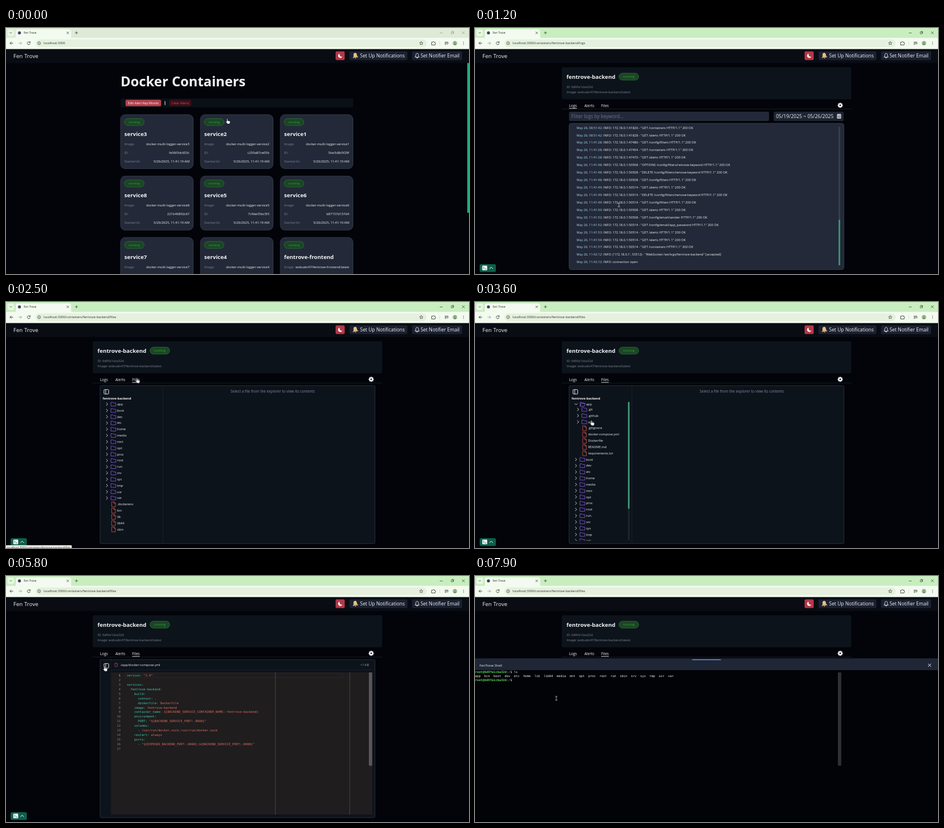
Write an HTML page that moves like this. It is 800x426 px and loops after 8000 ms.

```html
<!DOCTYPE html>
<html lang="en">
<head>
<meta charset="utf-8">
<title>Fen Trove</title>
<style>
html, body { margin: 0; width: 100%; height: 100%; overflow: hidden; background: #020409; }
svg { display: block; width: 800px; height: 426px; }
text { font-family: "Open Sans", "Noto Sans", sans-serif; white-space: pre; }
.mono { font-family: "DejaVu Sans Mono", "Liberation Mono", monospace; }
</style>
</head>
<body>
<svg id="stage" viewBox="0 0 800 426" xmlns="http://www.w3.org/2000/svg"></svg>
<script>
const LOOP = 8000;
const WHITE = '#f1f3f5', GREY = '#7f8591', CARD = '#232938', DARK = '#0d131b', GREEN = '#349a78';

// Drawing helpers, each returning markup
const rect = (x, y, w, h, fill, r = 0, more = '') =>
  `<rect x="${x}" y="${y}" width="${w}" height="${h}" rx="${r}" fill="${fill}" ${more}/>`;
const text = (x, y, s, size, fill = WHITE, more = '') =>
  `<text x="${x}" y="${y}" font-size="${size}" fill="${fill}" ${more}>${s}</text>`;
const line = (d, color, w = 0.9, more = '') =>
  `<path d="${d}" fill="none" stroke="${color}" stroke-width="${w}" stroke-linecap="round" stroke-linejoin="round" ${more}/>`;
const shape = (d, fill, more = '') => `<path d="${d}" fill="${fill}" ${more}/>`;
const dot = (x, y, r, fill, more = '') => `<circle cx="${x}" cy="${y}" r="${r}" fill="${fill}" ${more}/>`;
const group = (body, more = '') => `<g ${more}>${body}</g>`;
const at = (x, y, body) => group(body, `transform="translate(${x} ${y})"`);
const during = (from, to, body) => group(body, `data-from="${from}" data-to="${to}"`);
const BOLD = 'font-weight="700"', END = 'text-anchor="end"', MID = 'text-anchor="middle"', MONO = 'class="mono"';

const pill = (x, y) =>
  rect(x, y, 34, 12, '#1b4525', 6, 'stroke="#2a7a35" stroke-width=".7"') +
  text(x + 17, y + 8, 'running', 5.4, '#33a136', MID);

// Container overview
function card(col, row, [name, id, image, when]) {
  const x = 198 + col * 138, y = 150 + row * 106.4, right = x + 119;
  const extra = image.length > 1 ? 9 : 0;
  const field = (label, value, dy) =>
    text(x + 6.5, y + dy, label, 5.65, GREY) + text(right, y + dy, value, 5.65, WHITE, END);
  return rect(x, y, 125.5, row === 3 ? 102.5 : 93.6, CARD, 8, 'stroke="#3a4252" stroke-width=".8"') +
    pill(x + 6.7, y + 6.8) +
    text(x + 6.5, y + 36.8, name, 9.55, WHITE, BOLD) +
    field('Image:', image[0], 53) +
    (extra ? text(right, y + 62, image[1], 5.65, WHITE, END) : '') +
    field('ID:', id, 68 + extra) + field('Started At:', when, 83 + extra);
}

function homePage() {
  const logger = (n, id) => ['service' + n, id, ['docker-multi-logger-service' + n], '5/26/2025, 11:41:19 AM'];
  const own = (part, id, sec) =>
    ['fentrove-' + part, id, ['wobudo47/fentrove-' + part + ':latest'], '5/26/2025, 8:49:' + sec + ' AM'];
  const updater = own('autoupdate', 'e96d51e02662', 53);
  updater[2] = ['wobudo47/fentrove-', 'autoupdate:latest'];
  const cards = [
    logger(3, 'fe56f3dc653c'), logger(2, 'c250a87ce05b'), logger(1, '5be3c8b5f29f'),
    logger(8, '221b40892c67'), logger(5, '7c9be35bc5f3'), logger(6, 'b87157d137d4'),
    logger(7, '2a7412ebe5b9'), logger(4, 'a51004f233da'), own('frontend', '06c1406e8c47', 54),
    own('backend', '6d9fa1cba32d', 53), own('notifier', 'f6546cf1a6b5', 53), updater
  ];
  return group(
    text(198, 101, 'Docker Containers', 23.4, WHITE, BOLD) +
    rect(198, 122, 402, 15.5, '#0b0f16', 2) +
    rect(206.5, 124.3, 61.5, 11.2, '#b2424c', 2) + text(237.2, 132, 'Edit Alert Key-Words', 5.65, '#fff', MID) +
    rect(274.3, 126.5, 1, 7, '#e8eaed') +
    rect(282, 124.3, 38, 11.2, '#3a1019', 2) + text(301, 132, 'Clear Alerts', 5.65, '#d04c57', MID) +
    cards.map((c, i) => card(i % 3, Math.floor(i / 3), c)).join(''), 'id="home"') +
    rect(797, 60, 3, 260, '#22a884', 1, 'id="thumb"');
}

// Container details
function logView() {
  const remove = '/config/filters/remove-keyword';
  const requests = [
    ['08:51:42', 41826, 'GET /containers'], ['08:51:42', 41828, 'GET /alerts'],
    ['11:41:28', 47486, 'GET /config/filters'], ['11:41:28', 47454, 'GET /containers'],
    ['11:41:28', 47470, 'GET /alerts'], ['11:41:48', 50508, 'OPTIONS ' + remove],
    ['11:41:48', 50508, 'DELETE ' + remove], ['11:41:48', 50508, 'GET /config/filters'],
    ['11:41:49', 50514, 'GET /alerts'], ['11:41:49', 50514, 'DELETE ' + remove],
    ['11:41:49', 50514, 'GET /config/filters'], ['11:41:50', 50508, 'GET /alerts'],
    ['11:41:52', 50508, 'GET /config/email/sender'], ['11:41:52', 50514, 'GET /config/email/app_password'],
    ['11:41:53', 50514, 'GET /alerts'], ['11:41:54', 50514, 'GET /alerts'], ['11:41:57', 50514, 'GET /containers']
  ].map(([time, port, req]) => [time, `172.18.0.1:${port} - "${req} HTTP/1.1" 200 OK`]);
  const lines = requests.concat([
    ['11:42:12', `('172.18.0.1', 53512) - "WebSocket /ws/logs/fentrove-backend" [accepted]`],
    ['11:42:12', 'connection open']
  ]);
  const calendar = rect(625.5, 149.5, 7, 7.5, WHITE, 1) + line('M627.3 148.5v2M630.7 148.5v2', WHITE) +
    line('M626 151.6h6M626 153.4h6M626 155.2h6M627.8 151.6v5M630.2 151.6v5', CARD, 0.5);
  return rect(162.5, 145, 345.5, 16, CARD, 2) +
    text(166.5, 156.3, 'Filter logs by keyword...', 8.36, '#6c7280') +
    rect(516, 145, 121, 16, '#1e2432', 2) +
    text(520, 156.3, '05/19/2025 ~ 05/26/2025', 8.5) + calendar +
    rect(162.5, 165, 475, 253.5, CARD, 4, 'stroke="#363e4d" stroke-width=".8"') +
    group(lines.map(([time, msg], i) => text(175.5, 174.6 + i * 12.93,
      `<tspan fill="#a9d7f2">May 26, ${time}:</tspan> INFO: ${msg}`, 5.55)).join(''), 'clip-path="url(#logClip)"') +
    rect(628.3, 171, 2.6, 240, '#3a4150', 1) + rect(628.3, 332, 2.6, 79, GREEN, 1);
}

const page = 'M0 -4h3.8l2.2 2.2v6.2h-6zM3.6 -4v2.4h2.4';
const folder = 'M0 -3.2h3l1 1.2h4v5.2h-8z';
const openFolder = 'M0 3.2v-6.4h3l1 1.2h3.3v1.4M0 3.2l1.6 -4.6h7l-1.4 4.6z';

function tree(items, picked) {
  let out = '', y = 177;
  const walk = (list, depth) => list.forEach(([name, kind, kids], i) => {
    const x = depth * 3.4;
    if (depth || i) y += depth && !i ? 9 : 10.83;
    if (name === picked) out += rect(167, y - 4.6, 96, 9.2, '#14393a', 1);
    if (kind === 'file') out += at(183 + x, y, line(page, '#d8534f', 0.8));
    else out += at(174.6 + x, y, line(kids ? 'M-2.2 -1.2l2.2 2.3l2.2 -2.3' : 'M-1.2 -2.3l2.4 2.3l-2.4 2.3', '#d8dbe0')) +
      at(181.7 + x, y, line(kids ? openFolder : folder, '#8257d8', 0.85));
    out += text(192 + x, y + 2, name, 5.5);
    if (kids) walk(kids, depth + 1);
  });
  walk(items, 0);
  return group(out, 'clip-path="url(#treeClip)"');
}

function sidebar() {
  const dirs = s => s.split(' ').map(n => [n, 'dir']);
  const files = s => s.split(' ').map(n => [n, 'file']);
  const others = [...dirs('boot dev etc home media mnt opt proc root run srv sys tmp usr var'),
    ...files('.dockerenv bin lib lib64 sbin')];
  const source = [...dirs('__pycache__ routes'),
    ...files('__init__.py alerts.py config.yml docker_utils.py main.py send_email.py')];
  const app = inner => ['app', 'dir', [...dirs('.git .github'), ['app', 'dir', inner],
    ...files('.gitignore docker-compose.yml Dockerfile README.md requirements.txt')]];
  const bar = h => rect(264.4, 173, 2.6, 240, '#1f2733', 1) + rect(264.4, 173, 2.6, h, '#3f9f7a', 1);
  const full = [app(source), ...others];
  return during(2100, 5700,
    line('M271 145V418', '#1d2430', 0.8) +
    text(167, 168.5, 'fentrove-backend', 5.6, WHITE, BOLD) +
    during(2100, 3100, tree([['app', 'dir'], ...others])) +
    during(3100, 3700, tree([app(), ...others]) + bar(185)) +
    during(3700, 4400, tree(full) + bar(142)) +
    during(4400, 5700, tree(full, 'docker-compose.yml') + bar(142)));
}

function editor() {
  const yaml = [
    'version: "3.9"', '', 'services:', '  fentrove-backend:', '    build:', '      context: .',
    '      dockerfile: Dockerfile', '    image: fentrove-backend',
    '    container_name: ${BACKEND_SERVICE_CONTAINER_NAME:-fentrove-backend}', '    environment:',
    '      PORT: "${BACKEND_SERVICE_PORT:-8000}"', '    volumes:',
    '      - /var/run/docker.sock:/var/run/docker.sock', '    restart: always', '    ports:',
    '      - "${EXPOSED_BACKEND_PORT:-8000}:${BACKEND_SERVICE_PORT:-8000}"', ''
  ];
  const row = (s, i) => {
    const [, lead, key = '', value] = s.match(/^(\s*(?:- )?)([\w-]+:(?= |$))?(.*)$/);
    const y = 174 + i * 7.93;
    return text(198, y, i + 1, 5.32, i ? '#858585' : '#d0d0d0', END + ' ' + MONO) +
      text(208.8, y, `<tspan fill="#d4d4d4">${lead}</tspan><tspan fill="#3dc9b0">${key}</tspan>${value}`, 5.32, '#dc6f62', MONO);
  };
  return rect(181.5, 167, 600, 246, '#1f1d1e') +
    rect(206, 168, 376, 8, 'none', 0, 'stroke="#2c2a2b" stroke-width=".8"') +
    line('M465.4 167V413M594 167V413', '#4a544e', 0.8) + yaml.map(row).join('');
}

function filePane() {
  return rect(162.5, 144.8, 475, 273.5, DARK, 2, 'stroke="#2b323e" stroke-width=".9"') +
    rect(169.3, 151.7, 8.2, 7.6, 'none', 1, 'stroke="#f1f3f5" stroke-width=".9"') + line('M172.2 152V159', WHITE) +
    sidebar() +
    during(2100, 4500, text(461, 156.6, 'Select a file from the explorer to view its contents', 6.35, '#858b96', MID)) +
    during(4500, LOOP,
      group(group(
        at(188.5, 153.7, line(page, '#c94b66', 0.9, 'transform="scale(.7)"')) +
        text(198, 156, '/app/docker-compose.yml', 5.6) +
        line('M181.5 162.5H637', '#1d2430', 0.8) + line('M181.5 145V418', '#1a212c', 0.6) +
        during(4500, 4700, text(182, 173.3, 'Loading file content...', 5.5)) +
        during(4700, LOOP, editor()), 'id="pane"'), 'clip-path="url(#paneClip)"') +
      during(4700, LOOP, text(627, 156, '&lt;1 KB', 5.5, '#a2a7b0', END) + rect(627, 167, 5.7, 161.5, '#585657')));
}

function gear() {
  let teeth = '';
  for (let a = 0; a < 360; a += 45) teeth += rect(-1.1, -4.4, 2.2, 3, WHITE, 0.4, `transform="rotate(${a})"`);
  return at(631, 133.8, teeth + dot(0, 0, 2.3, 'none', `stroke="${WHITE}" stroke-width="1.7"`));
}

function detailPage() {
  const underline = (x, w) => rect(x, 138.8, w, 0.8, WHITE);
  return rect(0, 60, 800, 366, '#020409') +
    rect(150, 68, 500, 55.5, DARK, 2.5) +
    text(158, 88, 'fentrove-backend', 9.6, WHITE, BOLD) + pill(248.8, 78.2) +
    text(158.3, 104, 'ID: 6d9fa1cba32d', 5.55, GREY) +
    text(158.3, 113, 'Image: wobudo47/fentrove-backend:latest', 5.6, GREY) +
    text(162.5, 136.6, 'Logs', 6.35) + text(189, 136.6, 'Alerts', 6.35) + text(218, 136.6, 'Files', 6.35) +
    line('M150 140.3H650', '#1d232c', 0.8) + gear() +
    during(1000, 2100, underline(162.5, 13.5) + logView()) +
    during(2100, LOOP, underline(218, 13) + filePane()) +
    rect(8, 409, 28, 13.5, '#0d5f4b', 2.5) + rect(12.5, 411.6, 8.6, 7.8, WHITE, 1.2) +
    line('M14.3 413.6l1.6 1.5l-1.6 1.5M17 417.2h2.2', '#0d5f4b', 0.8) + line('M25.3 416.8l2.7 -2.7l2.7 2.7', WHITE, 1);
}

// Page header and browser frame
function header() {
  const bell = 'M-3.4 2.4c1.3 -1.2 .9 -3 1.2 -4.4c.4 -2.3 4 -2.3 4.4 0c.3 1.4 -.1 3.2 1.2 4.4z';
  return rect(0, 36.5, 800, 24, '#090c13') +
    text(12.7, 52, 'Fen Trove', 9.65) +
    rect(569.5, 40.5, 15.7, 15, '#b33848', 2) +
    shape('M576.6 44.2a3.9 3.9 0 1 0 4.7 5.2a3.7 3.7 0 0 1 -4.7 -5.2z', '#fff') +
    rect(593.5, 40.5, 100, 15, '#1b2130', 2) +
    at(603.5, 47.7, group(shape(bell, '#e6c08a', 'transform="scale(1.25)"') +
      line('M-4.4 3h8.8', '#c98a4a', 1.2) + dot(0, 4.2, 1.1, '#c98752'), 'transform="rotate(-8)"')) +
    text(611.8, 51.4, 'Set Up Notifications', 8.4) +
    rect(701.5, 40.5, 86.5, 15, '#1b2130', 2) +
    at(710.4, 47.7, line(bell, WHITE, 0.9) + line('M-1 4h2', WHITE, 1)) +
    text(716.2, 51.4, 'Set Notifier Email', 8.4);
}

function browser() {
  const ink = '#3c443a';
  const url = (from, to, path) => during(from, to, text(65, 28.4, 'localhost:3000' + path, 5.5, '#2c332b'));
  const deep = '/containers/fentrove-backend/';
  const controls = color => line('M750 8.6h4', color, 0.7) +
    rect(769.3, 7, 3.2, 3.2, 'none', 0.6, `stroke="${color}" stroke-width=".7"`) +
    line('M770.3 6h3.1v3.1M788.3 6.3l4 4m0 -4l-4 4', color, 0.7);
  return rect(0, 0, 800, 18, '#deead6') +
    during(0, 1000, controls('#8c9a87')) +
    during(1000, LOOP, rect(0, 0, 800, 18, '#c8eebf') + controls('#30382e')) +
    rect(2.5, 2.5, 11.5, 11.5, '#e9f6e3', 3.5) + line('M6.7 7.6l1.6 1.6l1.6 -1.6', ink, 0.8) +
    shape('M14 18q3 0 3 -3V6q0 -3.5 3.5 -3.5H109q3.5 0 3.5 3.5V15q0 3 3 3z', '#f3faef') +
    dot(23.2, 8.4, 2.6, '#394a63') + text(30.5, 10.3, 'Fen Trove', 4.9, '#262c25') +
    line('M105 6.7l3.4 3.4m0 -3.4l-3.4 3.4M119.6 8.3h4.2M121.7 6.2v4.2', ink, 0.8) +
    rect(0, 17, 800, 19.5, '#f3faef') + rect(51, 19.7, 676, 13.2, '#e5f0df', 6.6) +
    line('M12 26.3H7M9.2 24l-2.3 2.3l2.3 2.3', ink) +
    line('M22 26.3h5M24.8 24l2.3 2.3l-2.3 2.3', '#a1aa9d') +
    line('M41.5 25a2.6 2.6 0 1 0 .2 2.3M41.8 23.4v1.8h-1.8', ink) +
    dot(57.2, 26.3, 2.6, 'none', `stroke="${ink}" stroke-width=".7"`) + line('M57.2 26v1.5M57.2 24.8v.1', ink, 0.7) +
    url(0, 1000, '') + url(1000, 2100, deep + 'logs') + url(2100, LOOP, deep + 'files') +
    line('M717.5 23.3l.9 2l2.1 .2l-1.6 1.4l.5 2.1l-1.9 -1.1l-1.9 1.1l.5 -2.1l-1.6 -1.4l2.1 -.2z', ink, 0.7) +
    line('M735.8 24.5h1.8a1 1 0 0 1 2 0h1.7v1.5a1 1 0 0 1 0 2v1.4h-5.5z', ink, 0.9) +
    line('M749.5 23.5v5.5', '#c5dcbd', 0.7) +
    line('M758.5 24.5h5M758.5 26.4h3M758.5 28.3h2M763 28.2v-2.2h1.2', ink, 0.9) +
    dot(775.7, 26.3, 3.3, '#b9dcae', 'stroke="#537449" stroke-width=".7"') + dot(775.7, 25.4, 1.1, '#4b6943') +
    shape('M773.5 28.4a2.3 2 0 0 1 4.4 0z', '#4b6943') +
    [24.1, 26.3, 28.5].map(y => dot(790.6, y, 0.6, ink)).join('');
}

// Shell drawer
function shell() {
  const prompt = y => text(0, y, `<tspan fill="#57d657" ${BOLD}>root@6d9fa1cba32d</tspan>:<tspan fill="#6f9fe0">/</tspan>$`, 5.33, WHITE, MONO);
  const listing = 'app bin boot dev etc home lib lib64 media mnt opt proc root run sbin srv sys tmp usr var'.split(' ').join('  ');
  return during(6500, LOOP, group(
    rect(0, 142.5, 800, 284, '#020306') + rect(0, 142.5, 800, 20.5, '#1f2635') +
    rect(375, 144, 50, 2, '#4a76ab', 1) +
    text(8, 157, 'FenTrove Shell', 5.75) + line('M783.2 152.2l4.6 4.6m0 -4.6l-4.6 4.6', WHITE, 1) +
    rect(627, 167, 5.8, 161.5, '#2f3032') +
    during(6800, LOOP, prompt(168)) +
    during(7300, LOOP, text(67.4, 168, 'l', 5.33, WHITE, MONO)) +
    during(7400, LOOP, text(70.6, 168, 's', 5.33, WHITE, MONO)) +
    during(7600, LOOP, text(0, 175.2, listing, 5.33, WHITE, MONO) + prompt(182.4)), 'id="shell"'));
}

function pointer() {
  const hand = shape('M-1.6 -3.6q.8 -1 1.6 0v3l3.6 .9q.9 .3 .7 1.3l-.7 3.4h-4l-2.8 -3.6q.1 -1.2 1.6 -.2z',
    '#fff', 'stroke="#111" stroke-width=".6" stroke-linejoin="round"');
  const beam = line('M-1.4 -3.2h2.8M0 -3.2v6.4M-1.4 3.2h2.8', '#e4e6ea', 0.7);
  return group(during(0, 1200, hand) + during(1200, 1900, beam) + during(1900, 6600, hand) +
    during(6600, LOOP, beam), 'id="pointer"');
}

const clip = (id, x, y, w, h) => `<clipPath id="${id}">${rect(x, y, w, h, '#fff')}</clipPath>`;
const stage = document.getElementById('stage');
stage.innerHTML = `<defs>${clip('logClip', 163, 171, 470, 241)}${clip('treeClip', 163, 171, 108, 242.5)}` +
  `${clip('paneClip', 163, 145, 470, 273)}</defs>` +
  rect(0, 0, 800, 426, '#020409') +
  during(0, 1000, homePage()) + during(1000, LOOP, detailPage()) +
  header() + browser() +
  during(1900, 2800, rect(0, 421.3, 113.5, 6, '#f2f6ef', 1) +
    text(2, 427.3, 'localhost:3000/containers/fentrove-backend/files', 4.8, '#3a4038')) +
  shell() + pointer();

// Motion
const loop = (el, frames) => el.animate(frames, { duration: LOOP, iterations: Infinity });

// One keyframe per change, with no two sharing an offset
document.querySelectorAll('[data-from]').forEach(el => {
  const from = +el.dataset.from, to = +el.dataset.to;
  const steps = [[0, from ? 0 : 1]];
  if (from) steps.push([from, 1]);
  if (to < LOOP) steps.push([to, 0]);
  steps.push([LOOP, to < LOOP ? 0 : 1]);
  loop(el, steps.map(([t, opacity]) => ({ offset: t / LOOP, opacity, easing: 'step-end' })));
});

function move(id, steps) {
  const last = steps[steps.length - 1];
  const all = [...steps, [LOOP, last[1], last[2]]];
  loop(document.getElementById(id), all.map(([t, x, y, easing = 'linear']) =>
    ({ offset: t / LOOP, transform: `translate(${x}px, ${y}px)`, easing })));
}

move('home', [[0, 0, 0], [60, 0, 0, 'ease-in-out'], [580, 0, -153.7]]);
move('thumb', [[0, 0, 0], [60, 0, 0, 'ease-in-out'], [580, 0, 108.5]]);
move('pane', [[0, 108, 0, 'step-end'], [5700, 0, 0]]);
move('shell', [[0, 0, 284], [6500, 0, 284, 'ease-out'], [6750, 0, 0]]);
move('pointer', [
  [0, 383, 161], [100, 383, 161], [600, 406, 175.5, 'ease-in-out'], [900, 262, 352], [1050, 258, 352, 'ease-in-out'],
  [1500, 218, 157.5], [1600, 218, 157, 'ease-out'], [1900, 227, 135.5], [2600, 227, 135.5, 'ease-in-out'],
  [2950, 198, 178], [3150, 198, 178, 'ease-in-out'], [3500, 202, 209], [3750, 202, 209, 'ease-in-out'],
  [4250, 226, 315], [4420, 226, 315, 'ease-out'], [4600, 276, 295.5], [4750, 276, 295, 'ease-in-out'],
  [5500, 171, 160], [5850, 171, 160, 'ease-in-out'], [6350, 23, 416], [6550, 23, 416, 'ease-in-out'], [7000, 140.5, 211.8]
]);
</script>
</body>
</html>
```
